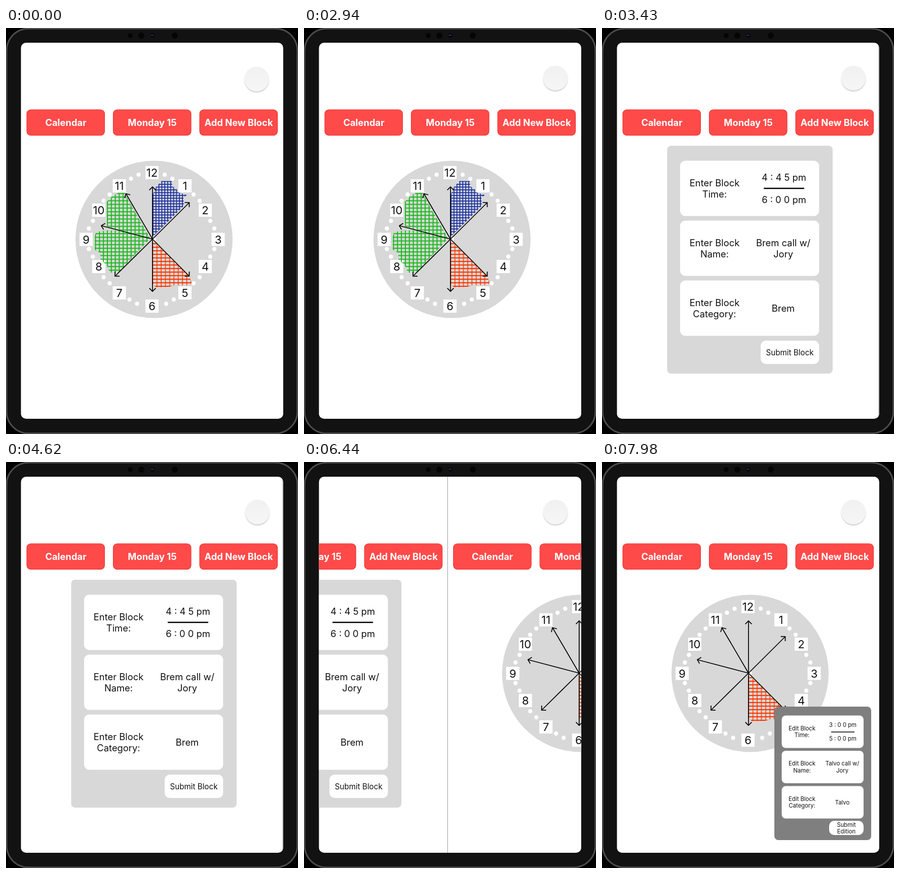
An HTML page that plays this animation: 576 by 800 pixels, repeating every 8 s.

```html
<!DOCTYPE html>
<html lang="en">
<head>
<meta charset="utf-8">
<title>Day planner on a tablet</title>
<style>
  html, body { margin: 0; width: 100%; height: 100%; overflow: hidden; background: #000; }
  svg { display: block; width: 576px; height: 800px; }
  text { font-family: Inter, "Liberation Sans", sans-serif; text-anchor: middle; fill: #111; }
  .button rect { fill: #ff4a4a; stroke: #ea3430; stroke-width: 1.1; }
  .button text { fill: #fff; font-size: 18.35px; font-weight: 700; }
  .dial text { font-size: 22px; }
  .hands { fill: none; stroke: #000; stroke-width: 1.7; }
  .form text { font-size: 18.35px; }
  .form .submit { font-size: 15.2px; }
  .popup text { font-size: 11.3px; }
  .card { fill: #fff; }
</style>
</head>
<body>
<svg viewBox="0 0 576 800">
  <defs>
    <clipPath id="screen"><rect x="29.5" y="29" width="517.3" height="741" rx="10"/></clipPath>
    <pattern id="blue" patternUnits="userSpaceOnUse" x="289" y="301.5" width="5.8" height="5.5">
      <path d="M0 1H5.8M1 0V5.5" stroke="#1c31a2" stroke-width="1.8"/>
    </pattern>
    <pattern id="red" patternUnits="userSpaceOnUse" x="288.3" y="424" width="8.4" height="7">
      <path d="M1 0V7" stroke="#ff5a1f" stroke-width="2"/>
      <path d="M0 1H8.4" stroke="#fb3204" stroke-width="2"/>
    </pattern>
    <pattern id="green" patternUnits="userSpaceOnUse" x="199" y="325" width="7.8" height="7.2">
      <path d="M0 1H7.8M1 0V7.2" stroke="#1cb91e" stroke-width="2"/>
    </pattern>
    <filter id="soft" x="-30%" y="-30%" width="160%" height="160%"><feGaussianBlur stdDeviation="1.2"/></filter>
    <linearGradient id="cap" x2="0" y2="1">
      <stop stop-color="#f1f1f1"/><stop offset="1" stop-color="#f6f6f6"/>
    </linearGradient>
    <g id="nav"></g>
    <g id="dial" class="dial"><circle cx="292" cy="416.5" r="155" fill="#d8d8d8"/></g>
    <g id="hands" class="hands"></g>
    <path id="redBlock" fill="url(#red)" d="M288.3 421L295 424 362 489 366 502 363 507 332 507 322 510 296 511 288.3 504Z"/>
  </defs>

  <!-- tablet -->
  <rect x="1.2" y="1.2" width="573.6" height="797.6" rx="43" fill="#121212" stroke="#4c4e4e" stroke-width="3"/>
  <g fill="#050505">
    <circle cx="245" cy="15" r="5"/><circle cx="267" cy="15" r="6"/>
    <circle cx="289" cy="15" r="4"/><circle cx="333" cy="15" r="6"/>
  </g>
  <path d="M286 15.5Q288 12 291 15.5" fill="none" stroke="#234a86" stroke-width="1.5"/>

  <g clip-path="url(#screen)">
    <rect x="29" y="29" width="518" height="741" fill="#fff"/>
    <g id="strip">
      <!-- day view -->
      <g>
        <use href="#nav"/>
        <use href="#dial"/>
        <path fill="url(#blue)" d="M288.5 410V330L296 313 307 301.5H327L328 312 337 318 340 324 357 329 350 334 351 350 293 408Z"/>
        <use href="#redBlock"/>
        <path fill="url(#green)" d="M199 342L210 331 221 325 234 325 239 335 284 414 199 391Z"/>
        <path fill="url(#green)" d="M178 402L196 399 222 399 284 415 222 482 205 482 199 468 186 455V443L175 437V410Z"/>
        <use href="#hands"/>
      </g>
      <!-- new block -->
      <g class="form" transform="translate(516.5)">
        <use href="#nav"/>
        <rect x="128.5" y="232" width="326.5" height="449" rx="8" fill="#d8d8d8"/>
        <g id="form"></g>
      </g>
      <!-- edit block -->
      <g class="popup" transform="translate(1033)">
        <rect x="29" y="29" width=".9" height="741" fill="#8a8a8a"/>
        <use href="#nav"/>
        <use href="#dial"/>
        <use href="#redBlock"/>
        <use href="#hands"/>
        <rect x="340" y="482" width="191" height="263" rx="8" fill="#7f7f7f"/>
        <g id="popup"></g>
      </g>
    </g>
    <g id="knob">
      <circle cx="496" cy="101" r="24" fill="#cfcfcf" filter="url(#soft)"/>
      <circle cx="496" cy="98.5" r="24.3" fill="url(#cap)"/>
    </g>
  </g>
</svg>

<script>
const $ = id => document.getElementById(id);
const add = (id, markup) => $(id).insertAdjacentHTML('beforeend', markup);
const text = (x, y, s, cls = '') => `<text x="${x}" y="${y}" class="${cls}">${s}</text>`;
const card = (x, y, w, h, r) => `<rect class="card" x="${x}" y="${y}" width="${w}" height="${h}" rx="${r}"/>`;
const rule = (x1, x2, y, w) => `<path d="M${x1} ${y}H${x2}" stroke="#000" stroke-width="${w}"/>`;

// Navigation buttons
['Calendar', 'Monday 15', 'Add New Block'].forEach((label, i) => {
  const x = 41 + i * 170.5;
  add('nav', `<g class="button"><rect x="${x}" y="161" width="153.5" height="50.5" rx="8"/>${text(x + 77, 193, label)}</g>`);
});

// Clock face: dots mirrored across the vertical axis, then hour labels
const dots = [[313, 289], [328, 297], [370, 328], [382, 340.5], [403, 380], [411, 395],
              [411, 435.5], [403, 450.5], [382, 491], [370, 503], [331, 535], [316, 543.5]];
for (const [x, y] of dots)
  for (const cx of [x, 574.5 - x]) add('dial', `<circle cx="${cx}" cy="${y}" r="4.2" fill="#fff"/>`);
add('dial', '<circle cx="291.5" cy="416" r="4.2" fill="#fff"/>');

const hours = [[288, 285], [353, 311], [393, 359], [418.5, 416.5], [393, 470], [353, 522],
               [288, 548], [223.5, 522], [183, 470], [158, 416.5], [183, 359], [223.5, 311]];
hours.forEach(([x, y], i) =>
  add('dial', `<rect x="${x - 13}" y="${y - 13}" width="26" height="26" fill="#fff"/>` + text(x, y + 8, i || 12)));

// Arrows from the centre
const hub = [289, 416];
const tips = [[289, 313], [361.5, 344], [361.5, 489], [289, 519], [215, 489], [188, 389.5], [236.5, 326.5]];
for (const [x, y] of tips) {
  const dx = x - hub[0], dy = y - hub[1];
  const turn = Math.atan2(dy, dx) * 180 / Math.PI;
  const len = Math.hypot(dx, dy);
  add('hands', `<path transform="translate(${hub}) rotate(${turn})" d="M0 0H${len}m-6.3 -6.3l6.3 6.3l-6.3 6.3"/>`);
}

// New block form
[['Time:', 261.5], ['Name:', 379.5], ['Category:', 497.5]].forEach(([label, y]) =>
  add('form', card(154, y, 274.3, 109, 10) + text(222, y + 50, 'Enter Block') + text(222, y + 72.2, label)));
add('form', text(359, 300.5, '4 : 4 5 pm') + rule(319, 399, 316, 2.4) + text(359, 345, '6 : 0 0 pm')
  + text(357.5, 429.5, 'Brem call w/') + text(357.5, 451.7, 'Jory') + text(357.5, 559, 'Brem')
  + card(313, 616, 115.3, 46, 10) + text(370.5, 644.5, 'Submit Block', 'submit'));

// Edit block popup
[['Time:', 499.5], ['Name:', 569], ['Category:', 638.5]].forEach(([label, y]) =>
  add('popup', card(354.5, y, 161.5, 64, 8) + text(394.5, y + 29.2, 'Edit Block') + text(394.5, y + 42.8, label)));
add('popup', text(475, 522, '3 : 0 0 pm') + rule(452, 498, 532, 1.6) + text(475, 549.3, '5 : 0 0 pm')
  + text(474, 598.2, 'Talvo call w/') + text(474, 611.8, 'Jory') + text(474, 674.5, 'Talvo')
  + card(448, 707, 68, 28, 10) + text(482, 718.7, 'Submit') + text(482, 732.3, 'Edition'));

// Two page slides per loop, shown at a held step rate
const LOOP = 8000, STEP = 70, SLIDE = 300, PAGE = 516.5;
const starts = [3123, 6335];
const easeOut = x => 1 - (1 - x) ** 1.65;
const progress = (t, start) => easeOut(Math.min(1, Math.max(0, (t - start) / SLIDE)));

function draw() {
  const t = Math.floor(performance.now() % LOOP / STEP) * STEP;
  const pages = starts.reduce((sum, start) => sum + progress(t, start), 0);
  $('strip').setAttribute('transform', `translate(${-PAGE * pages})`);
  $('knob').setAttribute('transform', t < STEP ? 'translate(-1.5 2)' : '');
  requestAnimationFrame(draw);
}
draw();
</script>
</body>
</html>
```
